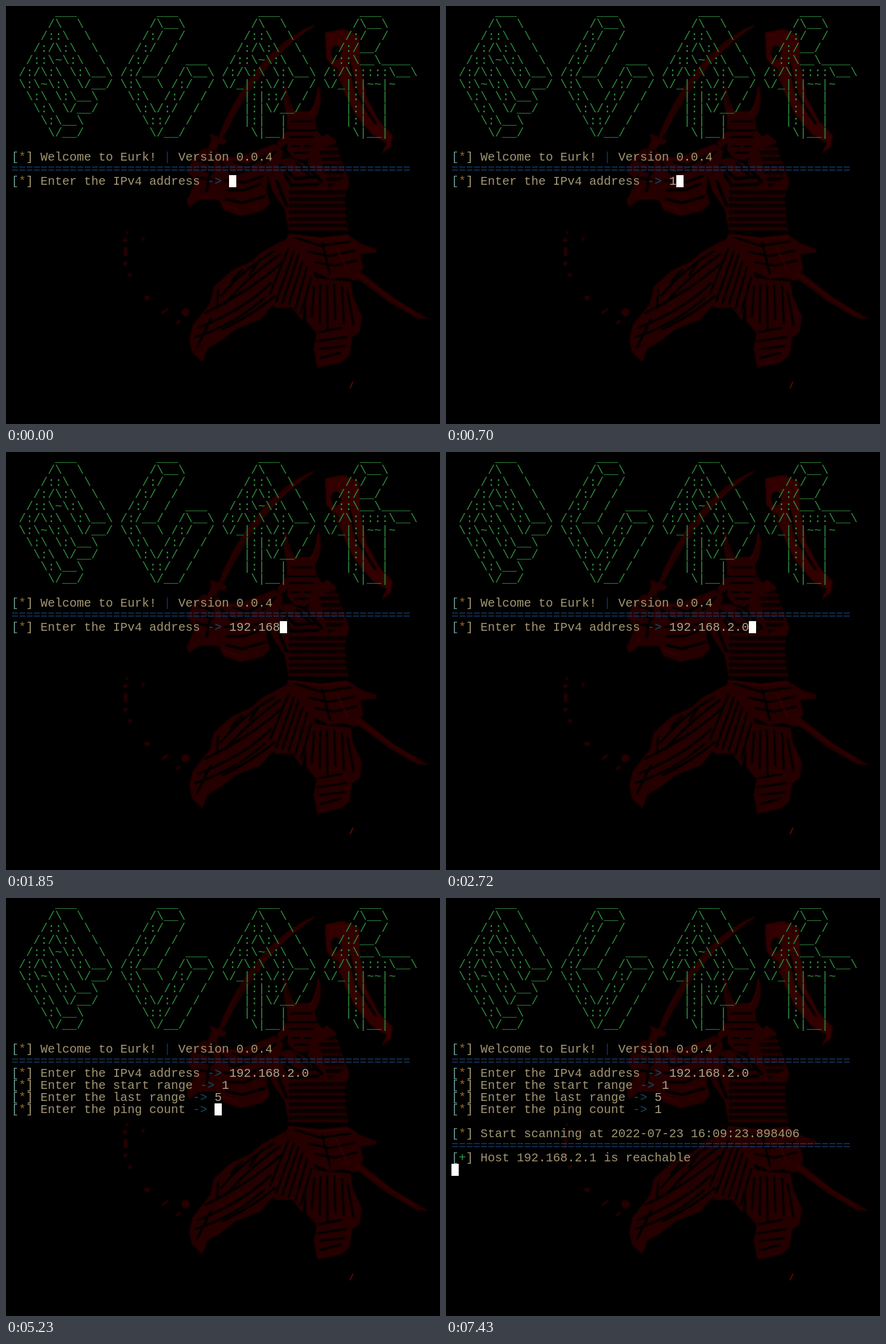
Animation of 718 by 692 pixels, one loop 8 s. Source, as an HTML page:

```html
<!DOCTYPE html>
<html lang="en">
<head>
<meta charset="utf-8">
<title>Terminal</title>
<style>
  html, body { margin: 0; width: 100%; height: 100%; overflow: hidden; background: #000; }
  #stage { position: relative; width: 718px; height: 692px; overflow: hidden; background: #000; }
  svg { position: absolute; left: 0; top: 0; }
  .row {
    position: absolute; left: 9px; white-space: pre;
    font: 20px/20px "Liberation Mono", "Courier New", monospace;
    color: #a39672;
  }
  .art { color: #2a8a3a; }
  .rule { color: #173c6c; }
  .edge { color: #67938a; }
  .star { color: #96692a; }
  .plus { color: #2f9a42; }
  .bar { color: #0c2f6c; }
  .arrow { color: #174a62; }
  .typed { color: #aea58c; }
  #cursor { position: absolute; width: 12px; height: 20px; background: #fffefa; }
</style>
</head>
<body>
<div id="stage">
  <svg width="718" height="692" viewBox="0 0 718 692">
    <defs>
      <pattern id="plates" width="9" height="11" patternUnits="userSpaceOnUse">
        <path d="M0 2h9M0 9.5h9" stroke="#000" stroke-width="3"/>
        <path d="M4 3v6" stroke="#100000"/>
      </pattern>
      <filter id="soft"><feGaussianBlur stdDeviation="1.3"/></filter>
    </defs>
    <g filter="url(#soft)">
      <g fill="#250000">
        <!-- blade and grip -->
        <path d="M511 31Q474 43 433 84Q387 133 358 200L351 219L356 221Q376 174 404 134Q442 82 511 31Z"/>
        <path d="M337 211L366 222L361 230L352 228L317 318L305 332L299 325L340 221Z"/>
        <!-- banner -->
        <path fill="#300000" d="M528 44L558 38L584 49L586 98L596 150L617 190L640 214L637 233L621 245L630 227L606 213L578 180L561 146L550 106L530 88Z"/>
        <!-- horns and helmet -->
        <path d="M462 128Q462 163 475 174L502 174Q517 160 517 127L521 150Q520 177 511 186L514 205L528 222L514 246L501 226L470 224L452 237L448 226L465 205L465 184Q456 158 462 128Z"/>
        <path d="M467 222L509 222L508 246L494 256L476 252L465 239Z"/>
        <!-- shoulders and arms -->
        <path d="M326 236L345 237L362 251L390 249L417 239L444 228L459 240L450 268L433 281L431 307L437 326L425 339L388 348L360 338L352 321L320 321L302 333L299 320L311 306L312 288L300 275L310 250Z"/>
        <path d="M510 226L531 211L545 222L556 257L568 291L561 316L534 312L517 279L498 264Z"/>
        <!-- chest, waist and belt -->
        <path d="M446 255L470 251L494 262L518 260L548 306L560 316L566 374L468 374L461 336L441 307L434 282Z"/>
        <path d="M466 377L521 383L565 378L585 392L612 402L613 408L586 411L591 433L580 455L556 449L535 452L506 438L493 406L464 391Z"/>
        <!-- trousers -->
        <path d="M468 383L423 407L407 422L373 438L344 464L337 493L309 528L303 554L308 574L325 590L333 568L356 554L380 535L421 519L448 487L488 410Z"/>
        <path d="M461 391L499 406L512 452L498 472L490 521L473 499L447 500L424 481L437 439Z"/>
        <path d="M504 448L532 453L570 456L574 481L589 514L585 540L573 548L568 579L555 590L515 599L509 567L514 542L497 522L496 479Z"/>
        <!-- side sword -->
        <path d="M573 432L592 444L642 484L700 518L680 517L633 490L581 451Z"/>
      </g>
      <rect x="468" y="302" width="96" height="72" fill="url(#plates)"/>
      <path d="M517 238l31-12 13 58-28 17z" fill="url(#plates)"/>
      <!-- folds and shading -->
      <g fill="none" stroke="#000" stroke-width="4" stroke-linecap="round">
        <path d="M444 406Q395 433 356 480M453 411Q401 448 362 493M458 423Q410 468 330 508M438 459Q395 502 318 533M428 483Q375 529 313 548M445 480Q410 510 359 535M351 470L349 500M390 437L372 456M418 422L403 445M339 518L316 565"/>
        <path d="M467 402L437 476M476 407L447 489M484 412L457 492M490 424L468 494M498 432L479 500M505 449L488 508"/>
        <path d="M510 464L506 514M520 462L519 525M531 461L532 533M543 461L545 519M556 464L559 525M565 473L575 528M518 540L555 533M516 555L563 548M519 568L560 563M520 583L553 574"/>
        <path d="M319 255L342 262M315 267L341 276M316 284L344 289M356 260L375 279L405 270M376 257L399 265L430 248M362 289L395 292L424 282M366 305L394 305L420 295M365 320L391 326L428 315M425 261L446 241M344 240L332 306" stroke-width="5"/>
        <path d="M472 191L506 191M466 206L512 206M470 217L508 217M474 232h11m9 0h10M478 243L500 243"/>
        <path d="M454 263L479 286L512 283M461 279L472 297L516 295M497 263L522 291M482 262L500 278M448 290L464 330" stroke-width="6"/>
        <path d="M478 383L520 397L569 390M501 407L535 414L577 405M512 424L544 430L580 421M523 392L536 443" stroke-width="4"/>
        <path d="M568 94L580 145L611 194" stroke-width="5"/>
      </g>
      <ellipse cx="546" cy="77" rx="9" ry="12"/>
      <g fill="none" stroke="#380000" stroke-width="2">
        <path d="M510 32Q428 80 360 213M531 48L572 46M534 87L571 157L621 210M462 133Q466 160 479 180M517 135Q514 161 502 180M363 252L390 257M358 327L385 338M578 442L633 481L676 509M470 379L520 386L566 382M546 398L566 440"/>
      </g>
      <!-- drifting specks -->
      <g fill="#250000">
        <path d="M198 373h4v4h-4zM192 387l6-4 4 5-5 4zM195 399h6v15h-6zM193 426l6-4 3 5-6 4zM223 382l7 1-3 8zM200 443l6-1 4 5-6 2zM228 481l8-2 3 6-8 3zM256 507l12-8 1 4-10 8z"/>
        <circle cx="297" cy="507" r="7"/>
        <path d="M281 522l7-3 2 4-8 5z"/>
      </g>
    </g>
    <path d="M569 633l5-11" stroke="#580a00" stroke-width="2"/>
  </svg>
  <div id="cursor"></div>
</div>
<script>
const LOOP = 8000, CELL = 12, LINE = 20, LEFT = 9;
const stage = document.getElementById('stage');
const cursor = document.getElementById('cursor');

const banner = String.raw`
      ___           ___           ___           ___
     /\  \         /\__\         /\  \         /\__\
    /::\  \       /:/  /        /::\  \       /:/  /
   /:/\:\  \     /:/  /        /:/\:\  \     /:/__/
  /::\~\:\  \   /:/  /  ___   /::\~\:\  \   /::\__\____
 /:/\:\ \:\__\ /:/__/  /\__\ /:/\:\ \:\__\ /:/\:::::\__\
 \:\~\:\ \/__/ \:\  \ /:/  / \/_|::\/:/  / \/_|:|~~|~
  \:\ \:\__\    \:\  /:/  /     |:|::/  /     |:|  |
   \:\ \/__/     \:\/:/  /      |:|\/__/      |:|  |
    \:\__\        \::/  /       |:|  |        |:|  |
     \/__/         \/__/         \|__|         \|__|`.slice(1).split('\n');

const rows = [];

// Each part is plain text or a [class, text] pair.
function addRow(index, ...parts) {
  const el = document.createElement('div');
  el.className = 'row';
  el.style.top = index * LINE + 1 + 'px';
  for (const part of parts) {
    const [name, text] = Array.isArray(part) ? part : ['', part];
    const span = document.createElement('span');
    span.className = name;
    span.textContent = text;
    el.append(span);
  }
  stage.insertBefore(el, cursor);
  const row = { el, index, cols: el.textContent.length };
  rows.push(row);
  return row;
}

const open = ['edge', '['];
const mark = ['star', '*'];
const rule = ['rule', '='.repeat(55)];

banner.forEach((text, i) => addRow(i, ['art', text]));
addRow(12, open, mark, '] Welcome to Eurk! ', ['bar', '|'], ' Version 0.0.4');
addRow(13, rule);

const prompts = {};
['IPv4 address', 'start range', 'last range', 'ping count'].forEach((label, i) => {
  const row = addRow(14 + i, open, mark, `] Enter the ${label} `, ['arrow', '->'], ' ', ['typed', '']);
  row.input = row.el.lastChild;
  prompts[row.index] = row;
});

addRow(19, open, mark, '] Start scanning at 2022-07-23 16:09:23.898406');
addRow(20, rule);
addRow(21, open, ['plus', '+'], '] Host 192.168.2.1 is reachable');

// time, cursor row, text typed on that row, cursor hidden
const steps = [
  [0, 14, ''], [430, 14, '', true],
  [670, 14, '1'], [880, 14, '19'], [1020, 14, '192'], [1230, 14, '192.'],
  [1720, 14, '192.16'], [1850, 14, '192.168'], [2230, 14, '192.168.'],
  [2400, 14, '192.168.2'], [2480, 14, '192.168.2.'], [2720, 14, '192.168.2.0'],
  [3080, 15, ''], [3350, 15, '1'],
  [3600, 16, ''], [4180, 16, '', true], [4600, 16, '5'],
  [5230, 17, ''], [5800, 17, '', true], [5880, 17, '1'],
  [6270, 22, ''], [6850, 22, '', true], [7430, 22, '']
];

let shown = -1;

function show(n) {
  const [, line, text, hidden] = steps[n];
  for (const row of rows) row.el.style.visibility = row.index <= line ? 'visible' : 'hidden';
  for (const row of Object.values(prompts)) {
    const last = steps.slice(0, n + 1).filter(s => s[1] === row.index).pop();
    row.input.textContent = last ? last[2] : '';
  }
  const start = prompts[line] ? prompts[line].cols : 0;
  cursor.style.left = LEFT + (start + text.length) * CELL + 'px';
  cursor.style.top = line * LINE + 'px';
  cursor.style.visibility = hidden ? 'hidden' : 'visible';
}

const begin = performance.now();

function tick() {
  const t = (performance.now() - begin) % LOOP;
  const n = steps.filter(s => s[0] <= t).length - 1;
  if (n !== shown) show(shown = n);
  requestAnimationFrame(tick);
}
tick();
</script>
</body>
</html>
```
